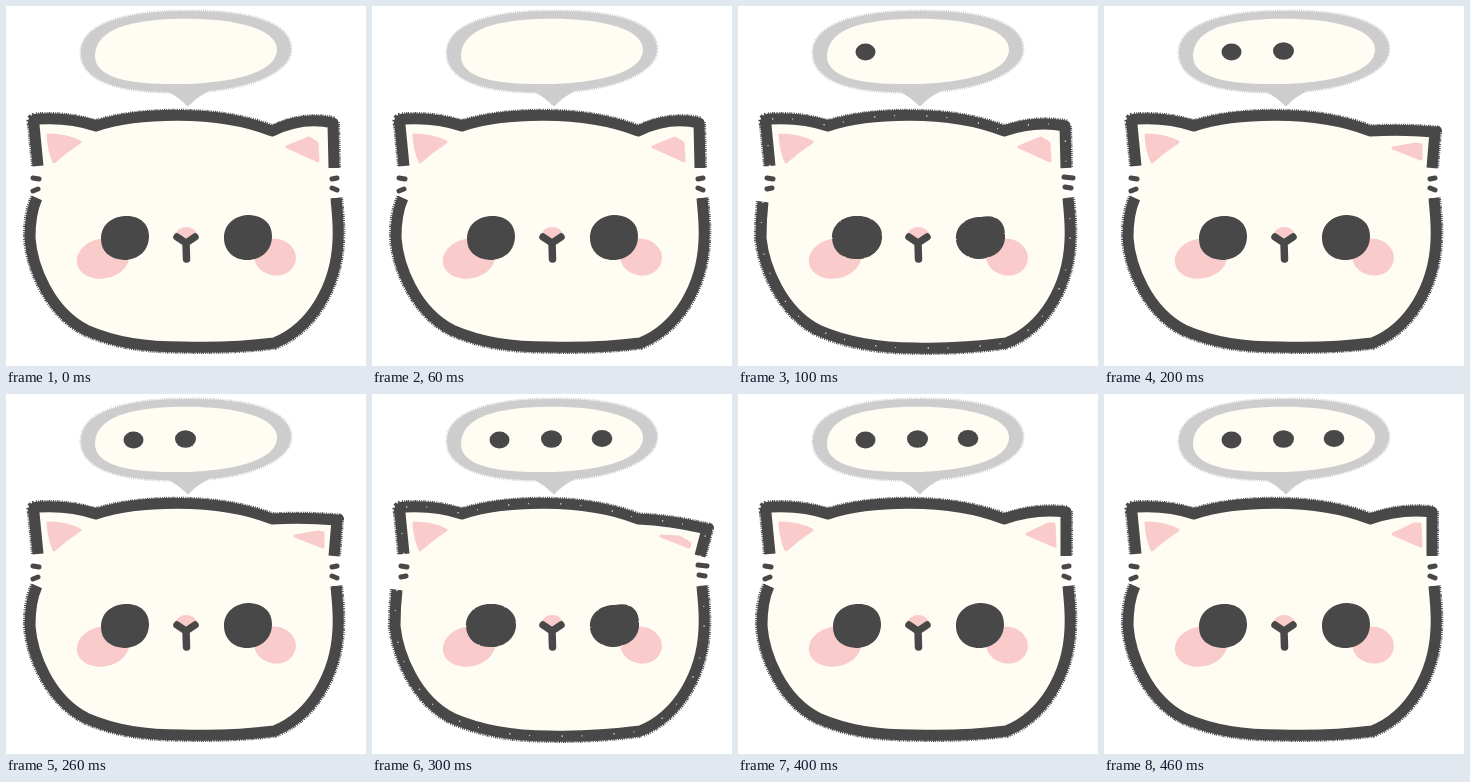
Write an HTML page that moves like this. It is 360 px wide and 360 px high and loops after 500 ms.

```html
<!DOCTYPE html>
<html lang="en">
<head>
<meta charset="utf-8">
<title>Thinking cat</title>
<style>
  html, body { margin: 0; width: 100%; height: 100%; overflow: hidden; background: #fff; }
  svg { display: block; width: 100vw; height: 100vh; }
  .cream { fill: #fffcf3; }
  .ink { fill: #484848; }
  .pink { fill: #f9cccb; }
  .line { fill: none; stroke: #484848; stroke-linejoin: round; }
  .fuzz { stroke-width: 11; stroke-dasharray: 1 1.2 .8 1 1.3 .7 .9 1.4; }
  .speck { fill: none; stroke: #fffcf3; stroke-width: 1.2; stroke-dasharray: 1.2 19 .8 31; }
</style>
</head>
<body>
<svg viewBox="0 0 360 360">
  <defs>
    <path id="bubble" d="M75 47C75 17 122 5 180 5C238 4 285 15 285 43C285 70 230 86 182 86C128 88 75 80 75 47Z"/>
  </defs>
  <g fill="#cdcdcd" stroke="#cdcdcd">
    <use href="#bubble" stroke-width="3" stroke-dasharray="1 1.2 .8 1.3"/>
    <path d="M162 85Q173 91 182 100Q190 91 202 85Z" stroke-width="1"/>
  </g>
  <path class="cream" d="M89 49C90 27 115 15 165 13C220 11 271 20 271 44C270 68 222 77 178 78C130 79 88 74 89 49Z"/>
  <g id="dots" class="ink">
    <ellipse cx="127.5" cy="46" rx="10" ry="8.5"/>
    <ellipse cx="179.5" cy="45" rx="10.5" ry="8.7"/>
    <ellipse cx="230" cy="44.5" rx="10.3" ry="8.5"/>
  </g>

  <path id="face" class="cream"/>
  <g transform="translate(180 225) scale(1.01) translate(-180 -225)">
    <path id="fuzz" class="line fuzz"/>
  </g>
  <path id="outline" class="line" stroke-width="11"/>
  <path id="whiskers" class="line" stroke-width="5" stroke-linecap="round"/>

  <g class="pink" stroke="#f9cccb" stroke-width="3" stroke-linejoin="round">
    <path d="M42 129Q60 129 74 136Q60 145 48 156Q43 145 42 129Z"/>
    <path id="innerEar"/>
  </g>
  <g class="pink">
    <ellipse cx="97" cy="252.5" rx="26.5" ry="20" transform="rotate(-12 97 252.5)"/>
    <ellipse cx="269" cy="251" rx="21" ry="18.5" transform="rotate(12 269 251)"/>
    <path d="M168 230Q172 221 180 221Q189 221 192 230Q180 234 168 230Z"/>
  </g>
  <path id="eyes" class="ink"/>
  <path class="line" stroke-width="7.5" stroke-linecap="round" d="M171 231L180 237L189 231M180 237L180.5 253"/>
  <path id="specks" class="speck"/>
</svg>
<script>
const $ = id => document.getElementById(id);
const STEP = 100, STEPS = 5;

// Right ear per step: outline tip, top-edge control height, inner ear corners.
const upright = { tip: [327, 117], bend: 110, inner: [281, 141, 303, 132, 311, 137, 312, 155] };
const ears = [
  upright,
  { ...upright, tip: [327, 120], bend: 114 },
  { tip: [331, 126], bend: 123, inner: [289, 142, 312, 138, 317, 139, 317, 153] },
  { tip: [335, 135], bend: 126, inner: [289, 142, 307, 143, 318, 149, 317, 153] },
  { tip: [328, 118], bend: 114, inner: [289, 140, 310, 130, 316, 130, 317, 152] }
];

// The line drawing boils between two takes.
const takes = [
  {
    jaw: [31, 192, 24], bottom: 341,
    whiskers: "M27 172L33 173M27 185L32 183M326 173L331 172M326 182L331 184",
    eyes: "M95 233C95 217 108 210 121 210C135 210 143 219 143 230C143 245 132 254 118 254C104 253 95 246 95 233Z" +
          "M218 232C218 217 230 209 244 209C258 210 266 218 266 230C266 244 256 254 241 254C228 254 218 245 218 232Z"
  },
  {
    jaw: [25, 196, 23], bottom: 342,
    whiskers: "M29 172L35 173M29 183L34 182M326 171L335 172M327 181L333 182",
    eyes: "M94 233C93 219 105 209 120 210C135 210 145 220 144 231C144 244 132 254 118 253C105 253 95 246 94 233Z" +
          "M218 234C217 219 229 211 243 211C258 208 267 215 267 229C268 243 257 252 242 253C229 253 219 245 218 234Z"
  }
];

function draw(step) {
  const { tip, bend, inner } = ears[step];
  const boiled = step % 2;
  const { jaw: [x, y, side], bottom, whiskers, eyes } = takes[boiled];
  const top = `M32 160L28 119Q26 113 32 113Q64 111 90 120` +
              `C130 107 210 103 266 125Q297 ${bend} ${tip}L328 162`;
  const jaw = `${x} ${y}C${side + 1} 205 ${side} 218 ${side} 232` +
              `C26 260 43 305 80 324C110 337 140 ${bottom} 177 ${bottom}` +
              `C215 ${bottom + 1} 245 340 268 337C306 322 330 280 332 235` +
              `C333 218 331 205 330 192`;
  const outline = `${top}M${jaw}`;

  $("outline").setAttribute("d", outline);
  $("fuzz").setAttribute("d", outline);
  $("face").setAttribute("d", `${top}L330 192L${x} ${y}L32 160ZM${jaw}Z`);
  $("whiskers").setAttribute("d", whiskers);
  $("innerEar").setAttribute("d", `M${inner}Z`);
  $("eyes").setAttribute("d", eyes);
  $("specks").setAttribute("d", boiled ? outline + eyes : "");
  [...$("dots").children].forEach((dot, i) => {
    dot.style.display = step > i ? "" : "none";
  });
}

const start = performance.now();
let shown = -1;
function tick() {
  const step = Math.floor((performance.now() - start) / STEP) % STEPS;
  if (step !== shown) draw(shown = step);
  requestAnimationFrame(tick);
}
tick();
</script>
</body>
</html>
```
